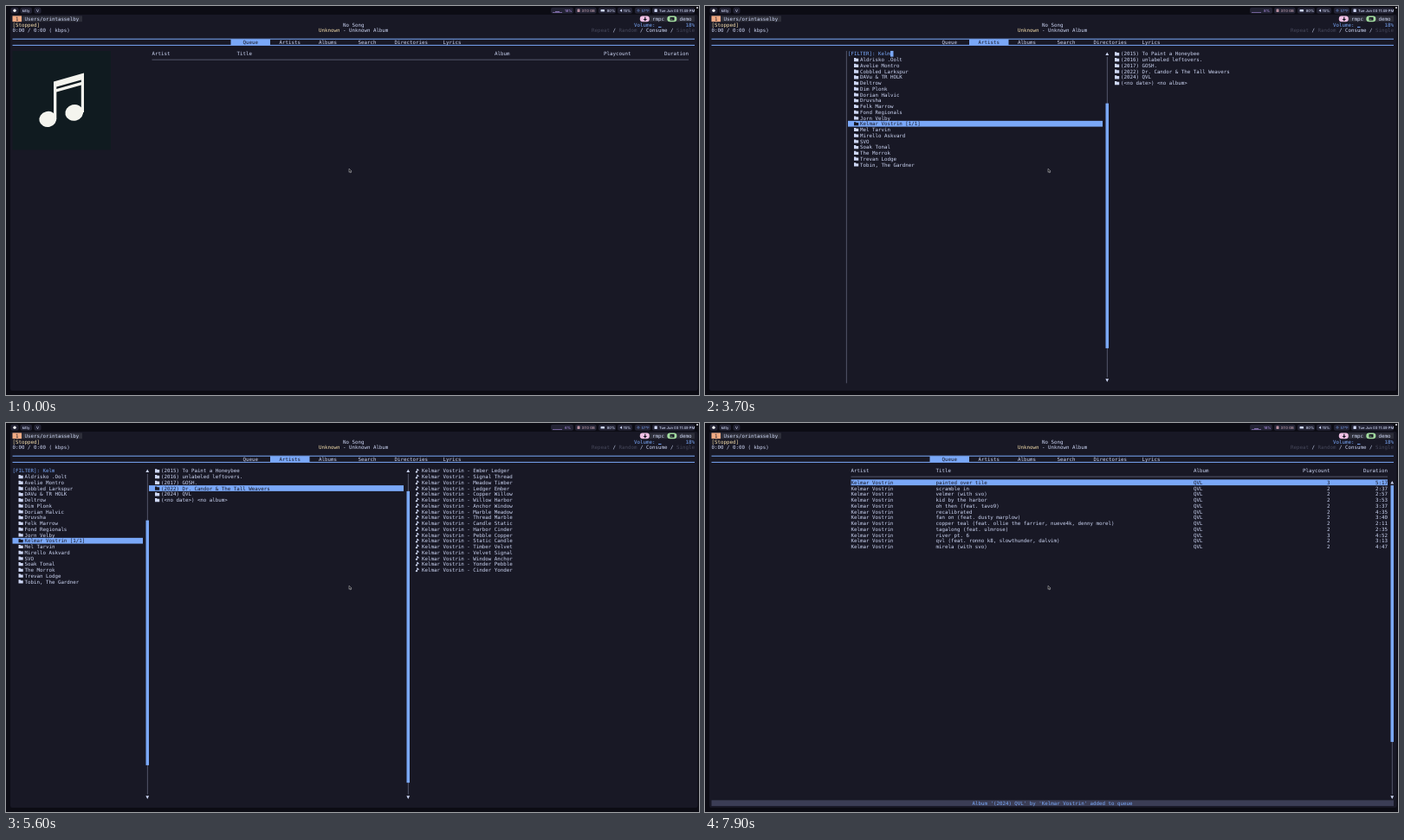
An HTML page that plays this animation: 800 px wide and 450 px high, repeating every 8000 ms.

```html
<!DOCTYPE html>
<html lang="en">
<head>
<meta charset="utf-8">
<title>Terminal music player</title>
<style>
  html, body { margin: 0; width: 100%; height: 100%; overflow: hidden; background: #0c0c14; }
  svg { display: block; width: 800px; height: 450px; }
  text { white-space: pre; text-rendering: geometricPrecision; }
  .mono { font: 5.814px "DejaVu Sans Mono", monospace; }
  .bar { font: 500 4.2px Inter, sans-serif; }
</style>
</head>
<body>
<svg id="stage" viewBox="0 0 800 450"><g id="base"></g><g id="screen"></g><g id="pointer"></g></svg>
<script>
const LOOP = 8000;
const CW = 3.5, RH = 6.745, LEFT = 7.5, TOP = 11.43, COLS = 225;
const C = {
  bg: '#181825', fg: '#cdd6f4', blue: '#7aa8f8', dim: '#45475a', rail: '#6c7086',
  yellow: '#f9e2af', red: '#f09a9c', peach: '#f2ab84', chip: '#2d2e39'
};

const artists = ['Aldrisko .Oolt', 'Avelie Montro', 'Cobbled Larkspur', 'DAVu & TR HOLK', 'Deltrow',
  'Dim Plonk', 'Dorian Halvic', 'Druvsha', 'Felk Marrow', 'Fond Regionals', 'Jorn Velby',
  'Kelmar Vostrin', 'Mel Tarvin', 'Mirello Askvard', 'SVO', 'Soak Tonal', 'The Morrok',
  'Trevan Lodge', 'Tobin, The Gardner'];
const STAR = 11;
const firstAlbums = ['(2016) Corvel', '(2018) Tindal', '(2019) Solmera'];
const starAlbums = ['(2015) To Paint a Honeybee', '(2016) unlabeled leftovers.', '(2017) GOSH.',
  '(2022) Dr. Candor & The Tall Weavers', '(2024) QVL', '(<no date>) <no album>'];
const queue = [
  ['painted over tile', 3, '5:17'], ['scramble in', 2, '2:37'], ['velmer (with svo)', 2, '2:57'],
  ['kid by the harbor', 2, '3:53'], ['oh then (feat. tavo9)', 2, '3:37'], ['recalibrated', 2, '4:35'],
  ['fan on (feat. dusty marplow)', 2, '3:40'],
  ['copper teal (feat. ollie the farrier, nueve4k, denny morel)', 2, '2:11'],
  ['tagalong (feat. ulmrose)', 2, '2:35'], ['river pt. 6', 3, '4:52'],
  ['qvl (feat. ronno k8, slowthunder, dalvim)', 2, '3:13'], ['mirela (with svo)', 2, '4:47']];
const words = ['Ember', 'Signal', 'Meadow', 'Ledger', 'Copper', 'Willow', 'Anchor', 'Marble', 'Thread',
  'Candle', 'Harbor', 'Pebble', 'Static', 'Timber', 'Velvet', 'Window', 'Yonder', 'Cinder'];
const songs = [
  ["Harlan's Puzzle", 'Too Late? (Interlude)', 'Duke Dorvo', 'Compartmentalized', 'Those Doors', 'o',
    'Unfazed', 'Too Soon? (Interlude)', 'Uncle', 'Yard Geometry', 'How Far A Lantern Glow', 'Undertones',
    'The Quieter The River', "You Don't Need Maps (Uncle Said)", 'a', 'Gentle Fox'],
  words.slice(0, 8).map((w, i) => `unlabeled 0${i + 1} | ${w.toLowerCase()}.`),
  words.slice(0, 14).map(w => w.toUpperCase() + '.'),
  words.map((w, i) => `${w} ${words[(i * 5 + 3) % 18]}`),
  queue.map(q => q[0])
];

const esc = s => String(s).replace(/&/g, '&amp;').replace(/</g, '&lt;');
const colX = c => LEFT + c * CW;
const rowY = r => TOP + r * RH;
const rect = (x, y, w, h, fill, rx = 0) =>
  `<rect x="${x}" y="${y}" width="${w}" height="${h}" fill="${fill}" rx="${rx}"/>`;
const cells = (c, r, w, fill, h = 1) => rect(colX(c), rowY(r), w * CW, h * RH, fill);
const text = (c, r, s, fill = C.fg, bold = false) =>
  `<text class="mono" x="${colX(c)}" y="${rowY(r) + 5.45}" fill="${fill}"${bold ? ' font-weight="700"' : ''}>${esc(s)}</text>`;
const textEnd = (c, r, s, fill) => text(c - String(s).length, r, s, fill);
const label = (x, s, fill = C.fg) => `<text class="bar" x="${x}" y="6.8" fill="${fill}">${s}</text>`;
const vline = (c, y1, y2) => rect(colX(c) + 1.4, y1, 0.7, y2 - y1, C.rail);
const path = (d, fill) => `<path d="${d}" fill="${fill}"/>`;

function folder(c, r, fill) {
  const x = colX(c), y = rowY(r) + 1.3;
  return path(`M${x} ${y}h2l.7 .8h2.5v3.4h-5.2z`, fill);
}
function note(c, r, fill) {
  const x = colX(c), y = rowY(r) + 1;
  return path(`M${x + 1.3} ${y}h.8l1.5 1.5v1.2l-1.5-.8v1.8a1.2 1 0 1 1-.8-.9z`, fill);
}

// Scrollbar with arrow heads; the thumb is snapped to whole cells.
function scrollbar(c, top, count, pos) {
  const view = 63 - top, track = view - 2, span = count - 1 + view;
  const from = Math.round(pos * track / span), to = Math.round((pos + view) * track / span);
  const x = colX(c) + CW / 2, y1 = rowY(top) + 3.4, y2 = rowY(62) + 3.4;
  return vline(c, rowY(top + 1), rowY(62)) + cells(c, top + 1 + from, 1, C.blue, to - from) +
    path(`M${x} ${y1 - 1.9}l1.9 3.7h-3.8z`, C.fg) + path(`M${x} ${y2 + 1.9}l1.9 -3.7h-3.8z`, C.fg);
}

function list(c, width, top, items, sel, icon, style = () => [C.fg, false]) {
  return items.map((s, i) => {
    const on = i === sel, [fill, bold] = on ? [C.bg, false] : style(i);
    return (on ? cells(c, top + i, width, C.blue) : '') +
      icon(c + 2, top + i, fill) + text(c + 4, top + i, s, fill, bold);
  }).join('');
}

function menuBar() {
  const pill = (x, w) => rect(x, 1.7, w, 7, '#232334', 2);
  return pill(5.5, 9) + '<circle cx="10" cy="5.2" r="1.7" fill="#f2f2f5"/>' +
    pill(16.5, 13.5) + label(18.7, 'kitty') + pill(32.5, 8) + label(35, 'V') +
    [[629, 26], [657, 24.5], [684, 20], [706, 17], [726, 18], [746, 49]].map(p => pill(...p)).join('') +
    rect(659.5, 3.6, 3, 3.4, '#b98fa0', .5) + label(664.5, '37.0 GB', '#c9a6b4') +
    rect(686.5, 4.1, 4.5, 2.5, C.fg, .6) + label(693.7, '80%') +
    path('M708.5 5.2l2.6-1.8v3.6z', C.fg) + label(712.7, '15%') +
    '<circle cx="730" cy="5.2" r="1.1" fill="none" stroke="#6d8fd6" stroke-width=".6"/>' + label(733.5, '57°F', '#6d8fd6') +
    rect(748.5, 3.5, 3.3, 3.5, C.fg, .5) + label(754, 'Tue Jun 03 11:49 PM') +
    '<circle cx="798" cy="2" r="1" fill="#e8e8ee"/>';
}

function header() {
  const rightChip = (c, fill, name) => cells(c + 3, 0, name.length + 2, C.chip) +
    rect(colX(c) - .2, rowY(0), 11, RH, fill, 3) + text(c + 4, 0, name);
  const modes = [['Repeat', 0], [' / ', 1], ['Random', 0], [' / ', 1], ['Consume', 1], [' / ', 1], ['Single', 0]];
  let c = 191;
  return cells(0, 0, 23, C.chip) + cells(0, 0, 3, C.peach) + text(1, 0, '1', C.bg) + text(4, 0, 'Users/orintasselby') +
    rightChip(207, '#f0c0e4', 'rmpc') + path('M737.2 12.7h1.2v2.4h1.6l-2.2 2.4-2.2-2.4h1.6z', C.bg) +
    rightChip(216, '#a3dca0', 'demo') + rect(766.5, 13, 5, 3.8, C.bg, .5) + rect(767.4, 14.8, 2, .7, '#a3dca0') +
    text(0, 1, '[Stopped]', C.yellow, true) + text(0, 2, '0:00 / 0:00 ( kbps)') +
    text(109, 1, 'No Song', C.fg, true) + text(101, 2, 'Unknown', C.yellow, true) + text(108, 2, ' - Unknown Album') +
    text(205, 1, 'Volume:', C.blue) + rect(colX(213), rowY(2) - 1, CW, 1, C.blue) + textEnd(COLS, 1, '18%', C.blue) +
    modes.map(([s, on]) => { const out = text(c, 2, s, on ? C.fg : C.dim); c += s.length; return out; }).join('') +
    rect(LEFT, 37.7, 787.5, 1, C.blue) + rect(LEFT, 44.9, 787.5, 1, C.blue);
}

function tabs(active) {
  return [['Queue', 76, 72], ['Artists', 88, 85], ['Albums', 101], ['Search', 114], ['Directories', 126], ['Lyrics', 142]]
    .map(([s, c, from]) => (s === active ? cells(from, 4, 13, C.blue) : '') +
      text(c, 4, s, s === active ? C.bg : C.fg)).join('');
}

function cover() {
  const ink = '#f4f4ee';
  return rect(7.5, 52, 113.5, 114.5, '#101b20') +
    '<g transform="rotate(-14 48 131)">' + `<ellipse cx="48.3" cy="131" rx="10" ry="9" fill="${ink}"/></g>` +
    '<g transform="rotate(-14 79 123)">' + `<ellipse cx="78.7" cy="123.3" rx="10.5" ry="9.3" fill="${ink}"/></g>` +
    path('M55 87.5L90 77.5V123h-3.2V91.5L58.3 99.5V131H55zM58.3 93.5V96L86.8 88V85.5z', ink);
}

function queueView(full) {
  let out = text(46, 6, 'Artist') + text(74, 6, 'Title') + text(159, 6, 'Album') +
    textEnd(204, 6, 'Playcount') + textEnd(223, 6, 'Duration') + rect(168.5, rowY(7) + 3.1, 619.5, .7, C.rail);
  if (!full) return out + cover();
  out += cells(46, 8, 177, C.blue);
  queue.forEach(([title, plays, time], i) => {
    const r = 8 + i, fill = i ? C.fg : C.bg;
    out += text(46, r, artists[STAR], fill) + text(74, r, title, fill) + text(159, r, 'QVL', fill) +
      textEnd(204, r, plays, fill) + textEnd(223, r, time, fill);
  });
  return out + scrollbar(224, 8, queue.length, 0);
}

function artistColumn(c, width, s) {
  const filtering = s.filter !== null;
  const hit = n => n.toLowerCase().includes((s.filter || '').toLowerCase());
  const names = artists.map((n, i) => {
    if (!filtering || i !== s.artist) return n;
    return `${n} [${artists.slice(0, i + 1).filter(hit).length}/${artists.filter(hit).length}]`;
  });
  const style = i => s.typing && hit(artists[i]) ? [C.red, true] : [C.fg, false];
  const prompt = '[FILTER]: ' + s.filter;
  return (filtering ? text(c, 6, prompt, C.blue) : '') +
    (s.typing ? cells(c + prompt.length, 6, 1, C.blue) : '') +
    list(c, width, filtering ? 7 : 6, names, s.artist, folder, style);
}

function artistsView(s) {
  if (s.view === 'opening') return vline(44, 52, 79) + vline(130, 52, 72);
  if (s.view === 'artists') {
    return vline(44, rowY(6), rowY(63)) + artistColumn(45, 84, s) + scrollbar(130, 6, artists.length, s.artist) +
      list(131, 94, 6, s.artist ? starAlbums : firstAlbums, -1, folder);
  }
  return artistColumn(0, 43, s) + scrollbar(44, 6, artists.length, s.artist) +
    list(45, 84, 6, starAlbums, s.album, folder) + scrollbar(130, 6, starAlbums.length, s.album) +
    list(131, 94, 6, songs[s.album].map(n => `${artists[STAR]} - ${n}`), -1, note);
}

function message() {
  return cells(0, 63, COLS, '#3b3d55') +
    text(86, 63, `Album '${starAlbums[4]}' by '${artists[STAR]}' added to queue`, C.blue);
}

const passed = (t, times) => times.filter(x => t >= x).length;

function stateAt(t) {
  const typed = passed(t, [2700, 2900, 3100, 3300]);
  return {
    view: ['idle', 'opening', 'artists', 'albums', 'queue'][passed(t, [1300, 1400, 4400, 7800])],
    filter: t < 2200 ? null : 'Kelm'.slice(0, typed),
    typing: t >= 2200 && t < 4000,
    artist: typed > 1 ? STAR : 0,
    album: passed(t, [5200, 5400, 5550, 5700]),
    cpu: [18, 8, 6, 18][passed(t, [2000, 4800, 7600])],
    notice: t >= 6500
  };
}

function render(s) {
  const onQueue = s.view === 'idle' || s.view === 'queue';
  return rect(631, 7, 11, .6, '#a78bda') + (s.cpu > 9 ? rect(634, 6.3, 5, .7, '#a78bda') : '') +
    label(645, s.cpu + '%', '#a78bda') + tabs(onQueue ? 'Queue' : 'Artists') +
    (onQueue ? queueView(s.view === 'queue') : artistsView(s)) + (s.notice ? message() : '');
}

const byId = id => document.getElementById(id);
byId('base').innerHTML = rect(0, 0, 800, 450, '#0c0c14') + rect(5, 10, 793.5, 435, C.bg, 2) + menuBar() + header();
byId('pointer').innerHTML =
  '<path d="M396 188.2v4.2l1-.9.7 1.4.8-.4-.7-1.3h1.3z" fill="#111" stroke="#c8c8d0" stroke-width=".5"/>';

let shown = '';
function frame(now) {
  const state = stateAt(now % LOOP), key = JSON.stringify(state);
  if (key !== shown) {
    byId('screen').innerHTML = render(state);
    shown = key;
  }
  requestAnimationFrame(frame);
}
frame(0);
</script>
</body>
</html>
```
